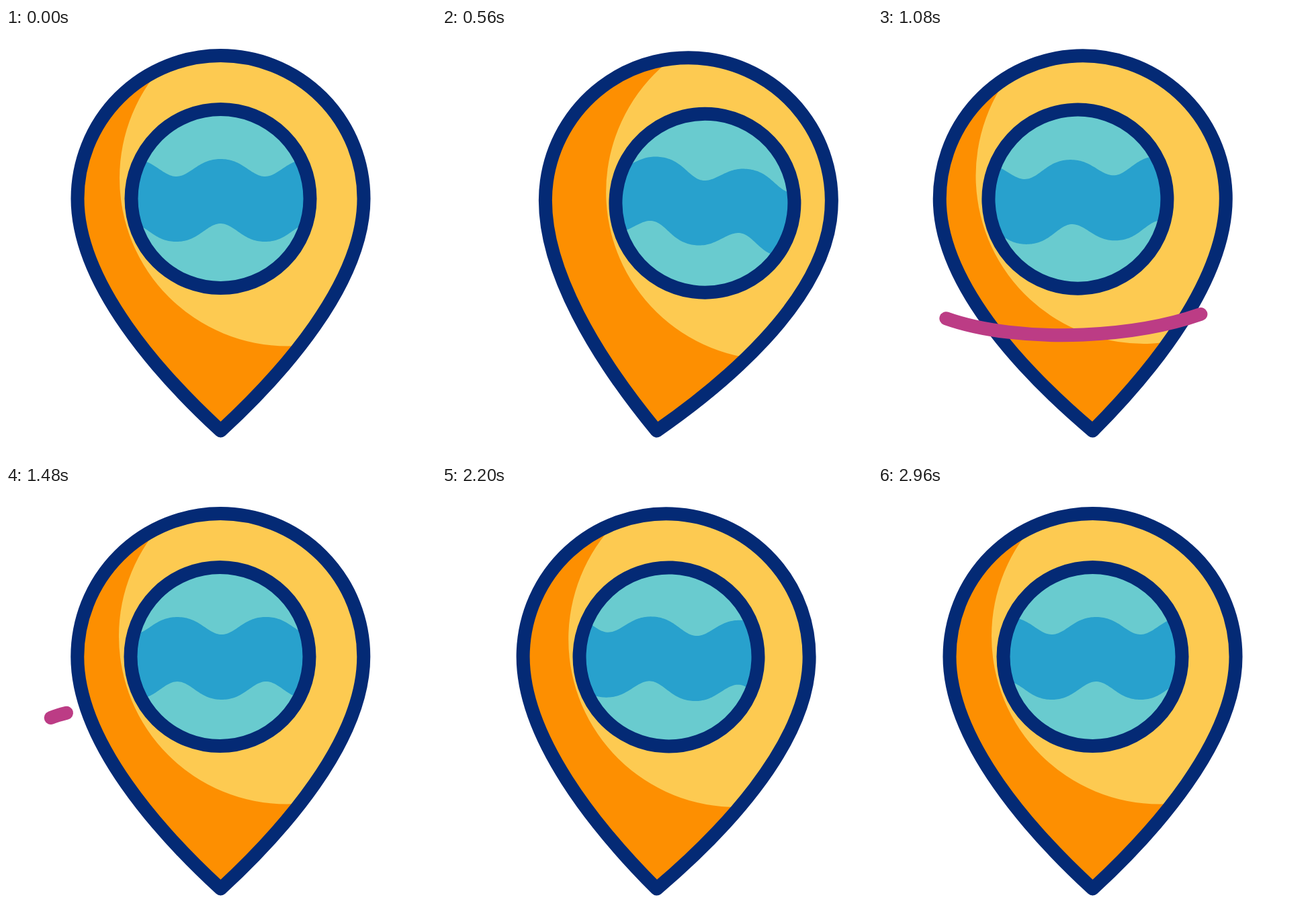
These frames come from a looping animation (640x640 px, 3 s). An HTML page:

```html
<!DOCTYPE html>
<html>
<head>
<meta charset="utf-8">
<style>
html, body { margin: 0; height: 100%; overflow: hidden; background: #fff; }
svg { display: block; width: 100%; height: 100%; }
.line { fill: none; stroke: #042a75; stroke-width: 20; stroke-linejoin: round; }
</style>
</head>
<body>
<svg viewBox="0 0 640 640">
  <defs>
    <path id="body" d="M319.5 599.5C230.500 517.500 106.500 381 106.500 254A213 213 0 0 1 532.500 254C532.500 381 408.500 517.500 319.500 599.500Z"/>
    <clipPath id="inBody"><use href="#body"/></clipPath>
    <clipPath id="inLens"><circle cx="319.5" cy="254" r="128"/></clipPath>
  </defs>
  <g id="pin">
    <use href="#body" fill="#fd8f01"/>
    <g clip-path="url(#inBody)">
      <circle class="slide" cx="419" cy="223.500" r="250" fill="#fdca51"/>
    </g>
    <use href="#body" class="line"/>
    <g class="slide">
      <g clip-path="url(#inLens)">
        <circle cx="319.5" cy="254" r="130" fill="#69cbcf"/>
        <path id="water" fill="#28a1cd"/>
      </g>
      <circle class="line" cx="319.5" cy="254" r="133"/>
      <path id="swoosh" pathLength="1" fill="none" stroke="#bc3c85" stroke-width="20" stroke-linecap="round"
        d="M548 337.600A270 42 0 0 1 589.500 360A270 96 0 0 1 49.500 360A270 42 0 0 1 91 337.600"/>
    </g>
  </g>
</svg>
<script>
const LOOP = 3000, WAVE = 132;
const pin = document.getElementById('pin');
const water = document.getElementById('water');
const swoosh = document.getElementById('swoosh');
const slides = document.querySelectorAll('.slide');

const ease = (t, from, to) => {
  const p = Math.min(1, Math.max(0, (t - from) / (to - from)));
  return p * p * (3 - 2 * p);
};

// Swings through the given values, one every 400 ms
function swing(t, values) {
  return values.reduce((sum, v, i) =>
    i ? sum + (v - values[i - 1]) * ease(t, 400 * i - 320, 400 * i + 80) : v, 0);
}

// round > 0 broadens the crests, round < 0 the troughs
function edge(x, crest, y, height, round) {
  const a = 2 * Math.PI * (x - crest) / WAVE;
  return y - height * (Math.cos(a) + round * (1 - Math.cos(2 * a)));
}

function waterPath(crest) {
  const top = [], bottom = [];
  for (let x = 186; x <= 454; x += 2) {
    top.push(x + ' ' + edge(x, crest, 208, 13, 0.12).toFixed(2));
    bottom.unshift(x + ' ' + edge(x, crest, 304.5, 13.5, -0.12).toFixed(2));
  }
  return 'M' + top.concat(bottom).join('L') + 'Z';
}

function draw(t) {
  const angle = swing(t, [0, 10, -10, 5, -5, 3, 0]);
  const shift = swing(t, [0, 31, -27, 12, -13.4, 5, 0]);
  pin.setAttribute('transform', `rotate(${angle} 319.5 599.5)`);
  slides.forEach(s => s.setAttribute('transform', `translate(${shift} 0)`));
  water.setAttribute('d', waterPath(319.5 - 3 * WAVE * t / LOOP));

  const head = ease(t, 600, 1280), tail = ease(t, 850, 1560);
  swoosh.style.display = head > tail ? '' : 'none';
  swoosh.setAttribute('stroke-dasharray', `${head - tail} 9`);
  swoosh.setAttribute('stroke-dashoffset', -tail);
}

const start = performance.now();
function tick() {
  draw((performance.now() - start) % LOOP);
  requestAnimationFrame(tick);
}
tick();
</script>
</body>
</html>
```
